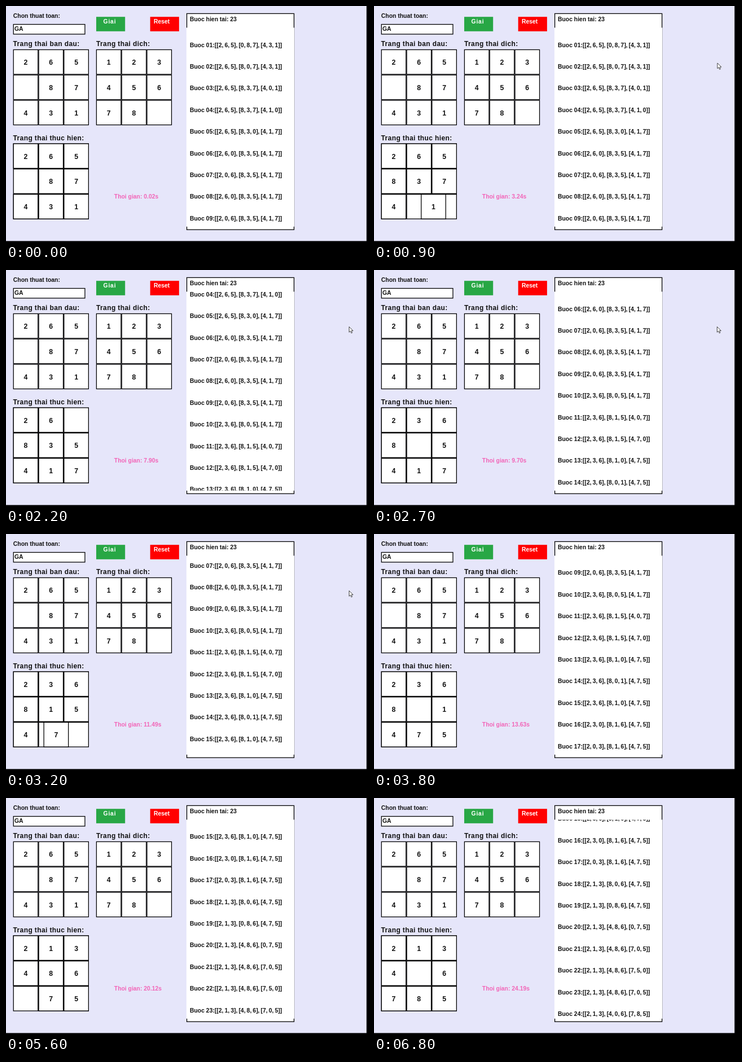
An HTML page that plays this animation: 642 by 418 pixels, repeating every 7000 ms.

```html
<!DOCTYPE html>
<html lang="vi">
<head>
<meta charset="utf-8">
<title>8-puzzle</title>
<style>
  html, body { margin: 0; width: 100%; height: 100%; overflow: hidden; background: #e6e6fa; }
  svg { display: block; width: 642px; height: 418px; }
  text { font: bold 10.4px "Liberation Sans", Arial, sans-serif; fill: #111; white-space: pre; }
  .title { font-size: 12px; letter-spacing: 0.39px; }
  .digit { font-size: 12.3px; text-anchor: middle; }
  .light { fill: #fff; }
  .wide { letter-spacing: 0.8px; }
  .time { fill: #f266b8; }
  .state { word-spacing: -0.8px; }
  .box { fill: #fff; stroke: #000; stroke-width: 1.28; }
</style>
</head>
<body>
<svg id="stage" viewBox="0 0 642 418">
  <defs><clipPath id="view"><rect x="320" y="38.4" width="191" height="352.4"/></clipPath></defs>
</svg>
<script>
const LOOP = 7000, TICK = 100;
const CELL = 44.8, ROW = 38.4, NOTCH = 12.8, EDGE = 0.64;
const PERIOD = 1.008, SLIDE = 0.5;          // seconds on the puzzle's own clock
const START = "265087431", GOAL = "123456780";
const BLANKS = "347852121478545214367874";  // cell of the gap at each step

// [ms, value] keys
const CLOCK = [[0, .02], [1600, 5.74], [2700, 9.7], [3800, 13.63], [4800, 17.24], [5600, 20.12], [6730, 24.19]];
const SCROLL = [[850, 0], [1600, 7], [2700, 15], [3800, 24], [4800, 33], [5600, 42], [5900, 44.5]];
const MOUSE_X = [[200, 205], [500, 626], [800, 609], [1000, 608]];
const MOUSE_Y = [[200, 20], [500, 112], [800, 101], [1000, 100]];

const stage = document.getElementById("stage");

function add(parent, tag, attrs, content) {
  const el = document.createElementNS("http://www.w3.org/2000/svg", tag);
  for (const key in attrs) el.setAttribute(key, attrs[key]);
  if (content !== undefined) el.textContent = content;
  parent.appendChild(el);
  return el;
}
const rect = (x, y, width, height, fill) => add(stage, "rect", { x, y, width, height, fill });
const label = (x, y, str, cls = "", parent = stage) => add(parent, "text", { x, y, class: cls }, str);
const move = (el, x, y) => el.setAttribute("transform", `translate(${x} ${y})`);

// white box whose border lies inside its bounds
const box = (parent, x, y, w, h) => add(parent, "rect", {
  x: x + EDGE, y: y + EDGE, width: w - 2 * EDGE, height: h - 2 * EDGE, class: "box"
});

function lerpKeys(keys, t) {
  if (t <= keys[0][0]) return keys[0][1];
  for (let i = 1; i < keys.length; i++) {
    const [t0, a] = keys[i - 1], [t1, b] = keys[i];
    if (t <= t1) return a + (b - a) * (t - t0) / (t1 - t0);
  }
  return keys[keys.length - 1][1];
}

const cellXY = i => [i % 3 * CELL, Math.floor(i / 3) * CELL];

function tile(parent, x, y, digit) {
  const g = add(parent, "g", {});
  move(g, x, y);
  box(g, 0, 0, CELL, CELL);
  if (digit !== "0") label(CELL / 2, CELL / 2 + 4.9, digit, "digit", g);
  return g;
}

function board(x, y, digits) {
  const g = add(stage, "g", {});
  move(g, x, y);
  [...digits].forEach((d, i) => tile(g, ...cellXY(i), d));
  return g;
}

// every board along the solution
const states = [START];
for (let i = 1; i < BLANKS.length; i++) {
  const s = [...states[i - 1]];
  s[BLANKS[i - 1]] = s[BLANKS[i]];
  s[BLANKS[i]] = "0";
  states.push(s.join(""));
}
const asList = s => "[" + s.match(/.../g).map(r => `[${[...r].join(", ")}]`).join(", ") + "]";

// controls
rect(0, 0, 642, 418, "#e6e6fa");
label(12.8, 20.8, "Chon thuat toan:");
box(stage, 12.6, 31.9, 128, 18.6);
label(15, 43.5, "GA");
rect(160, 19.2, 51.2, 25.6, "#28a745");
label(172.5, 30.7, "Giai", "light wide");
rect(255.7, 19.2, 51.2, 25.6, "#ff0000");
label(262, 30.7, "Reset", "light");

// boards
label(12.5, 71, "Trang thai ban dau:", "title");
board(12.6, 76.8, START);
label(160, 71, "Trang thai dich:", "title");
board(159.8, 76.8, GOAL);
label(12.5, 237.7, "Trang thai thuc hien:", "title");
const live = board(12.6, 243.3, "000000000");
const tiles = {};
for (const d of "12345678") tiles[d] = tile(live, 0, 0, d);
const time = label(191.8, 341.2, "", "time");

// step list
box(stage, 320, 12.8, 191.4, 384);
rect(320, 38.4, 191.4, 352.4, "#fff");
label(326, 27.3, "Buoc hien tai: 23");
const list = add(add(stage, "g", { "clip-path": "url(#view)" }), "g", {});
states.forEach((s, i) => {
  const y = 72.5 + i * ROW;
  label(326, y, `Buoc ${String(i + 1).padStart(2, "0")}:`, "", list);
  label(370, y, asList(s), "state", list);
});

// window edges
rect(0, 416.3, 642, 1.7, "#000");
rect(639.4, 0, 2.6, 418, "#000");

const mouse = add(stage, "path", {
  d: "M.5 .5V10.2L2.8 8.2 4.4 11.8 6 11.1 4.5 7.6H7.6Z",
  fill: "#fff", stroke: "#333", "stroke-width": .9
});

function render(ms) {
  const t = Math.floor(ms / TICK + 1e-4) * TICK;
  const sec = lerpKeys(CLOCK, t);
  time.textContent = `Thoi gian: ${sec.toFixed(2)}s`;

  // slide number n starts at n periods
  const n = Math.min(Math.floor(sec / PERIOD), states.length - 1);
  const from = states[Math.max(n - 1, 0)], to = states[n];
  const p = Math.min((sec - n * PERIOD) / SLIDE, 1);
  for (const d in tiles) {
    const [x0, y0] = cellXY(from.indexOf(d)), [x1, y1] = cellXY(to.indexOf(d));
    move(tiles[d], x0 + (x1 - x0) * p, y0 + (y1 - y0) * p);
  }

  const notches = Math.min(Math.round(lerpKeys(SCROLL, t)), 44.5);
  move(list, 0, -notches * NOTCH);

  mouse.style.display = t >= 200 && t < 3500 ? "" : "none";
  move(mouse, lerpKeys(MOUSE_X, t), lerpKeys(MOUSE_Y, t));
}

const begin = performance.now();
function loop() {
  render((performance.now() - begin) % LOOP);
  requestAnimationFrame(loop);
}
loop();
</script>
</body>
</html>
```
